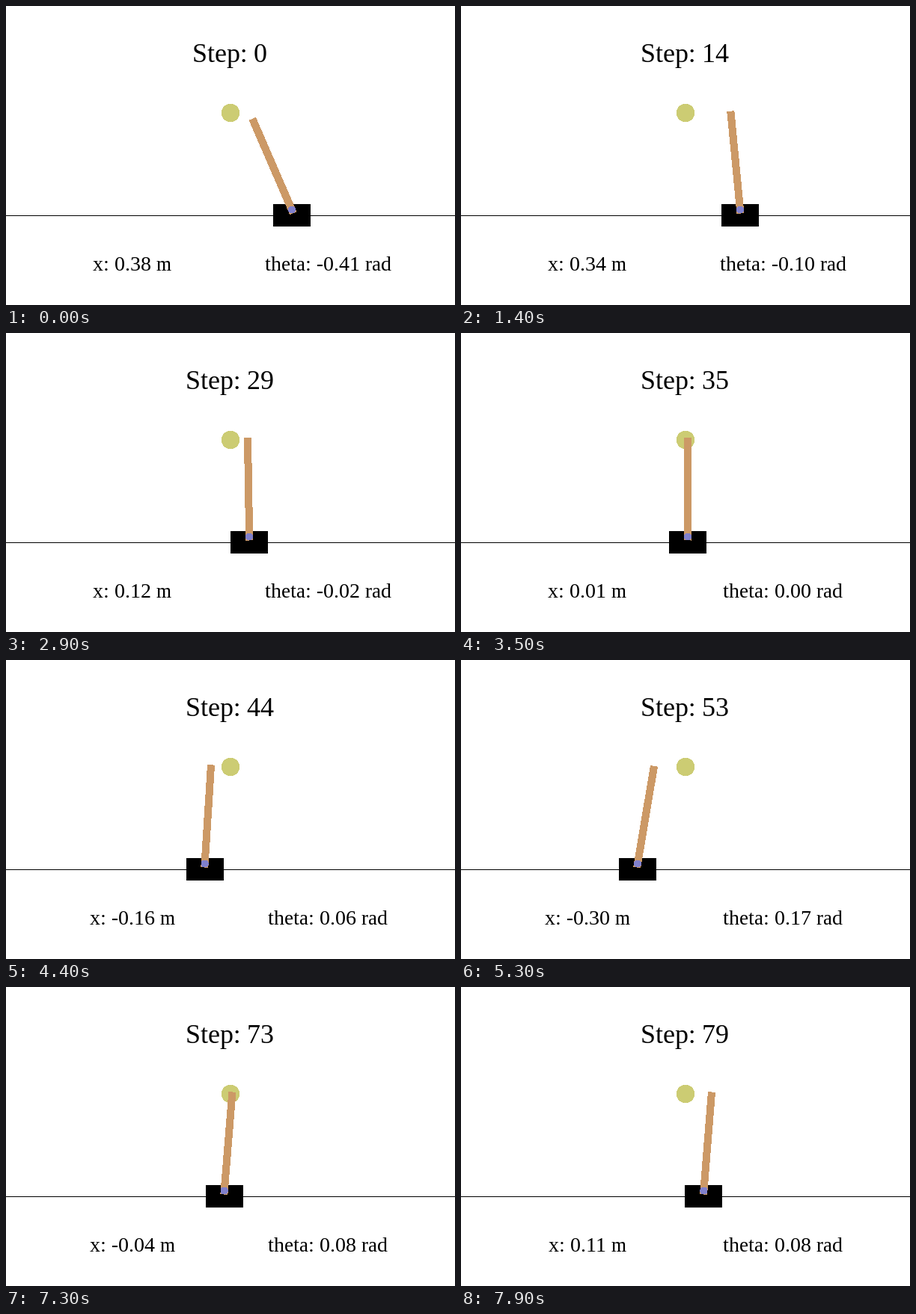
These frames come from a looping animation (600 px wide and 400 px high, 8 s). A matplotlib script:

```python
import numpy as np
import matplotlib.pyplot as plt
from matplotlib.animation import FuncAnimation
from matplotlib.patches import Circle, Polygon, Rectangle

plt.rcParams.update({
    "font.family": "Liberation Serif",
    "text.hinting": "default",
    "text.hinting_factor": 1,
})

W, H, DPI = 600, 400, 100
STEPS, INTERVAL = 80, 100
SCALE = W / 2.8            # pixels per metre
ROD = 0.6413               # pole length in metres
POLE_LEN, POLE_W = ROD * SCALE, 10
TRACK_Y = 280
AXLE_Y = TRACK_Y - 7.5
GRAVITY, DT = 9.8, 1 / 30
EDGE = 0.5                 # unsmoothed fills grow by half a pixel


def pole_angle(t):
    """The pole recovers, swings over once, then settles into a steady lean."""
    recover = -0.408 * np.exp(-t / 9.7)
    lean = 0.08 / (1 + np.exp((45 - t) / 5.2))
    swing = 0.104 * np.exp(-((t - 54) / 6.5) ** 2 / 2)
    return recover + lean + swing


def cart_path(t, theta):
    """Cart motion that drives a uniform rod, bent smoothly through waypoints."""
    k = 3 / (2 * ROD)
    fall = np.cumsum(np.cumsum(theta)) * k * GRAVITY * DT**2
    free = (fall - theta) / k
    at = np.array([0, 14, 22, 35, 53, 67, 79])
    x = np.array([0.382, 0.3407, 0.2287, 0.014, -0.2987, -0.1633, 0.114])
    bend = np.polyfit(at / STEPS, x - free[at], len(at) - 1)
    return free + np.polyval(bend, t / STEPS)


steps = np.arange(STEPS)
thetas = pole_angle(steps)
xs = cart_path(steps, thetas)

fig = plt.figure(figsize=(W / DPI, H / DPI), dpi=DPI, facecolor="white")
ax = fig.add_axes([0, 0, 1, 1])
ax.set(xlim=(0, W), ylim=(H, 0))
ax.axis("off")


def add(patch, color, z):
    patch.set(facecolor=color, linewidth=0, antialiased=False, zorder=z)
    return ax.add_patch(patch)


def label(x, y, px):
    return ax.text(x, y, "", fontsize=px * 72 / DPI, color="black",
                   ha="center", va="baseline", zorder=6)


cart = add(Rectangle((0, TRACK_Y - 15), 50, 30), "black", 1)
add(Circle((W / 2, 143), 12 - EDGE), (0.8, 0.8, 0.45), 2)
pole = add(Polygon(np.zeros((4, 2))), (0.8, 0.6, 0.4), 3)
axle = add(Circle((0, AXLE_Y), POLE_W / 2 - EDGE), (0.5, 0.5, 0.8), 4)
ax.plot([0, W], [TRACK_Y - 0.5] * 2, color="black", lw=72 / DPI, zorder=5)

title = label(W / 2 - 1, 75, 36)
x_label = label(169, 354, 28)
theta_label = label(430, 354, 28)


def update(step):
    x, theta = xs[step], thetas[step]
    px = W / 2 + x * SCALE
    along = np.array([np.sin(theta), -np.cos(theta)])
    across = np.array([np.cos(theta), np.sin(theta)]) * (POLE_W / 2 - EDGE)
    base = np.array([px, AXLE_Y])
    low = base - along * (POLE_W / 2 - EDGE)
    top = base + along * (POLE_LEN - POLE_W / 2 - EDGE)

    cart.set_x(round(px) - 25)
    pole.set_xy([low - across, top - across, top + across, low + across])
    axle.center = px, AXLE_Y
    title.set_text(f"Step: {step}")
    x_label.set_text(f"x: {x:.2f} m")
    theta_label.set_text(f"theta: {theta:.2f} rad")
    return cart, pole, axle, title, x_label, theta_label


anim = FuncAnimation(fig, update, frames=STEPS, interval=INTERVAL,
                     repeat=True, repeat_delay=0)
plt.show()
```
